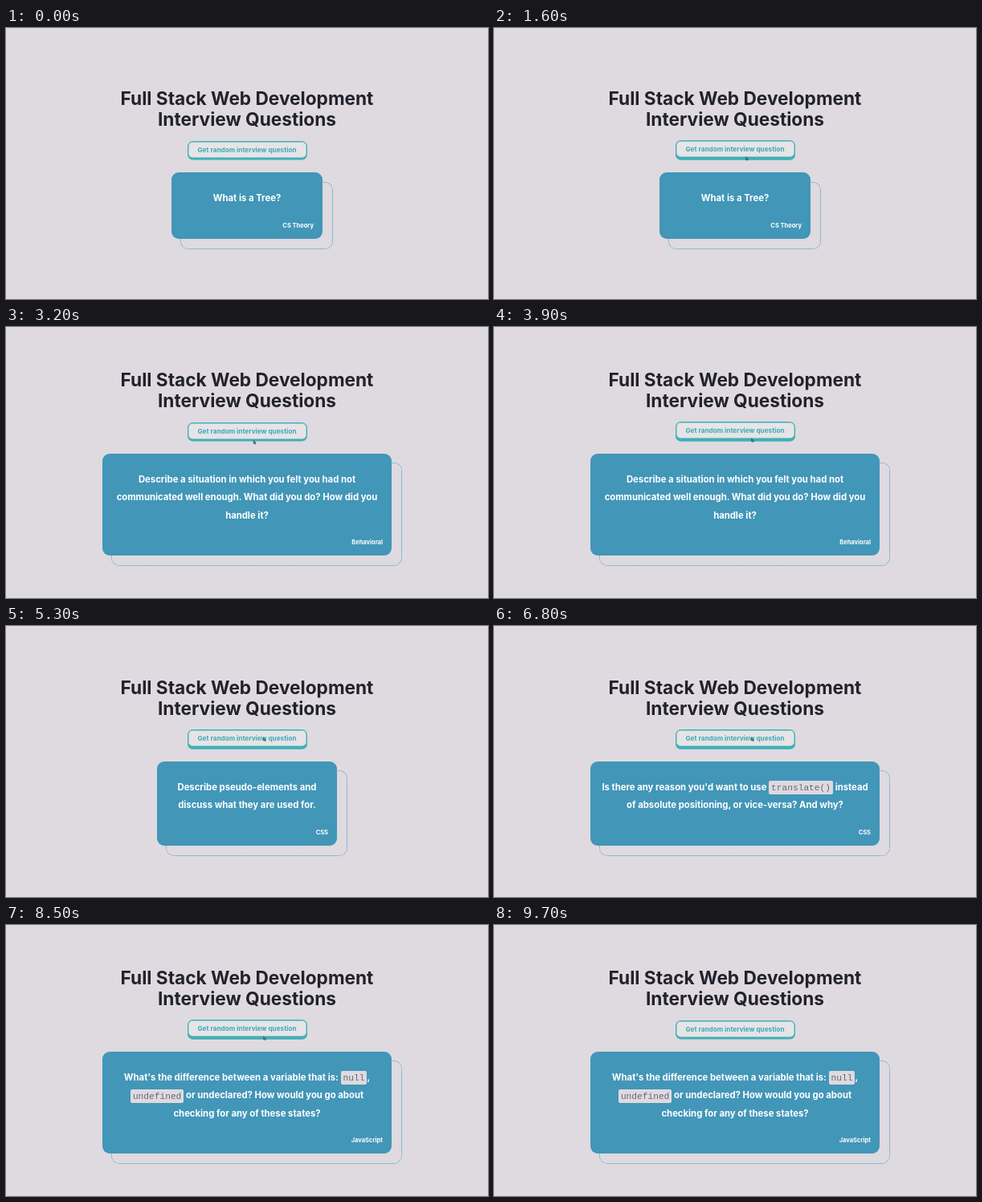
Write an HTML page that moves like this. It is 600x338 px and loops after 10 s.

```html
<!DOCTYPE html>
<html lang="en">
<head>
<meta charset="utf-8">
<title>Interview Questions</title>
<style>
html, body { margin: 0; width: 100%; height: 100%; overflow: hidden; background: #dedae0; }
body { position: relative; font-family: Inter, Rubik, sans-serif; font-weight: 700; }
#page { position: absolute; left: 0; top: 0; width: 600px; height: 338px; }
h1 {
  position: absolute; top: 75.3px; width: 100%; margin: 0;
  font-size: 22.65px; line-height: 25.8px; text-align: center; color: #21222c;
}
#button {
  position: absolute; left: 225.5px; top: 141px; width: 149px; height: 22px;
  box-sizing: border-box; border: 1px solid #3fafb7; border-radius: 6.5px;
  background: #e6e4e7; box-shadow: inset 0 0 0 .4px #3fafb7, 0 1.5px #3fafb7;
  font-size: 8.2px; line-height: 20.4px; text-align: center; color: #3eaab5;
}
#button.hover { top: 140px; box-shadow: inset 0 0 0 .4px #3fafb7, 0 2.7px #3fafb7; }
#card { position: absolute; top: 180px; color: #fff; }
#card::before, #card::after { content: ""; position: absolute; }
#card::before { inset: 11.5px -13px -13px 11px; border: 1px dotted #3f9bbc; border-radius: 10px; }
#card::after { inset: 0; border-radius: 9px; background: #4296b8; }
#question, #tag { position: absolute; z-index: 1; white-space: nowrap; }
#question { top: 21.1px; width: 100%; font-size: 11.3px; line-height: 22.5px; text-align: center; }
#tag { right: 11px; bottom: 10.6px; font-size: 7.5px; line-height: 10px; }
code {
  padding: 2.6px 3px; border-radius: 2px; background: #dedae0; color: #666872;
  font: 400 11.2px/0 "Liberation Mono", monospace;
}
#cursor { position: absolute; left: 0; top: 0; }
</style>
</head>
<body>
<div id="page">
  <h1>Full Stack Web Development<br>Interview Questions</h1>
  <div id="button">Get random interview question</div>
  <div id="card"><div id="question"></div><div id="tag"></div></div>
</div>
<svg id="cursor" width="6" height="7.5" viewBox="0 0 8 10">
  <path d="M.6 .6V6L2 4.9 3 7 4.2 6.4 3.2 4.4H5Z" fill="#2fa39c" stroke="#2b4a50" stroke-width=".8"/>
</svg>
<script>
const LOOP = 10000, FADE = 250, LINE = 22.5;
const cards = [
  { leave: 2122, width: 188, tag: "CS Theory", lines: ["What is a Tree?"] },
  { leave: 3970, width: 360, tag: "Behavioral", lines: [
    "Describe a situation in which you felt you had not",
    "communicated well enough. What did you do? How did you",
    "handle it?"] },
  { leave: 5440, width: 224, tag: "CSS", lines: [
    "Describe pseudo-elements and",
    "discuss what they are used for."] },
  { leave: 7690, width: 360, tag: "CSS", lines: [
    "Is there any reason you'd want to use <code>translate()</code> instead",
    "of absolute positioning, or vice-versa? And why?"] },
  { leave: Infinity, width: 360, tag: "JavaScript", lines: [
    "What's the difference between a variable that is: <code>null</code>,",
    "<code>undefined</code> or undeclared? How would you go about",
    "checking for any of these states?"] }
];
// Pointer path: time, x, y
const path = [
  [900, 30, 199], [1100, 306, 204], [1310, 306, 204], [1500, 313, 160],
  [2600, 313, 160], [2900, 307.5, 141], [3500, 307.5, 141], [3700, 320, 138.5],
  [9250, 320, 138.5], [9600, 10, 284], [9700, 10, 284]
];
const $ = id => document.getElementById(id);
const [page, button, card, question, tag, cursor] =
  ["page", "button", "card", "question", "tag", "cursor"].map($);
let shown = -1;

// CSS "ease": cubic-bezier(.25, .1, .25, 1)
function ease(t) {
  if (t <= 0) return 0;
  if (t >= 1) return 1;
  const bez = (s, a, b) => 3 * a * s * (1 - s) ** 2 + 3 * b * s * s * (1 - s) + s ** 3;
  let lo = 0, hi = 1;
  for (let i = 0; i < 20; i++) {
    const mid = (lo + hi) / 2;
    if (bez(mid, .25, .25) < t) lo = mid; else hi = mid;
  }
  return bez(lo, .1, 1);
}

function pointer(t) {
  const i = path.findIndex(p => p[0] > t);
  if (i < 1) return null;
  const [t0, x0, y0] = path[i - 1], [t1, x1, y1] = path[i];
  const k = (t - t0) / (t1 - t0);
  return [x0 + (x1 - x0) * k, y0 + (y1 - y0) * k];
}

function show(i) {
  if (i === shown) return;
  shown = i;
  const { width, lines, tag: label } = cards[i];
  card.style.width = width + "px";
  card.style.left = 300 - width / 2 + "px";
  card.style.height = 60 + LINE * lines.length + "px";
  question.innerHTML = lines.join("<br>");
  tag.textContent = label;
}

function draw(t) {
  const i = cards.findIndex(c => t < c.leave + FADE);
  show(i);
  const enter = i ? ease((t - cards[i - 1].leave - FADE) / FADE) : 1;
  const leave = ease((t - cards[i].leave) / FADE);
  const visible = enter * (1 - leave);
  card.style.opacity = visible;
  card.style.transform = visible < 1 ? `scale(${1.1 - .1 * visible})` : "none";

  const lift = (cards[i].lines.length - 1) * LINE / 2;
  page.style.top = -lift + "px";

  const at = pointer(t);
  cursor.style.display = at ? "block" : "none";
  if (at) cursor.style.transform = `translate(${at[0]}px, ${at[1]}px)`;
  const top = 141 - lift;
  button.className = at && at[0] > 226 && at[0] < 374 && at[1] > top && at[1] < top + 22 ? "hover" : "";
}

const start = performance.now();
function tick() {
  draw((performance.now() - start) % LOOP);
  requestAnimationFrame(tick);
}
tick();
</script>
</body>
</html>
```
